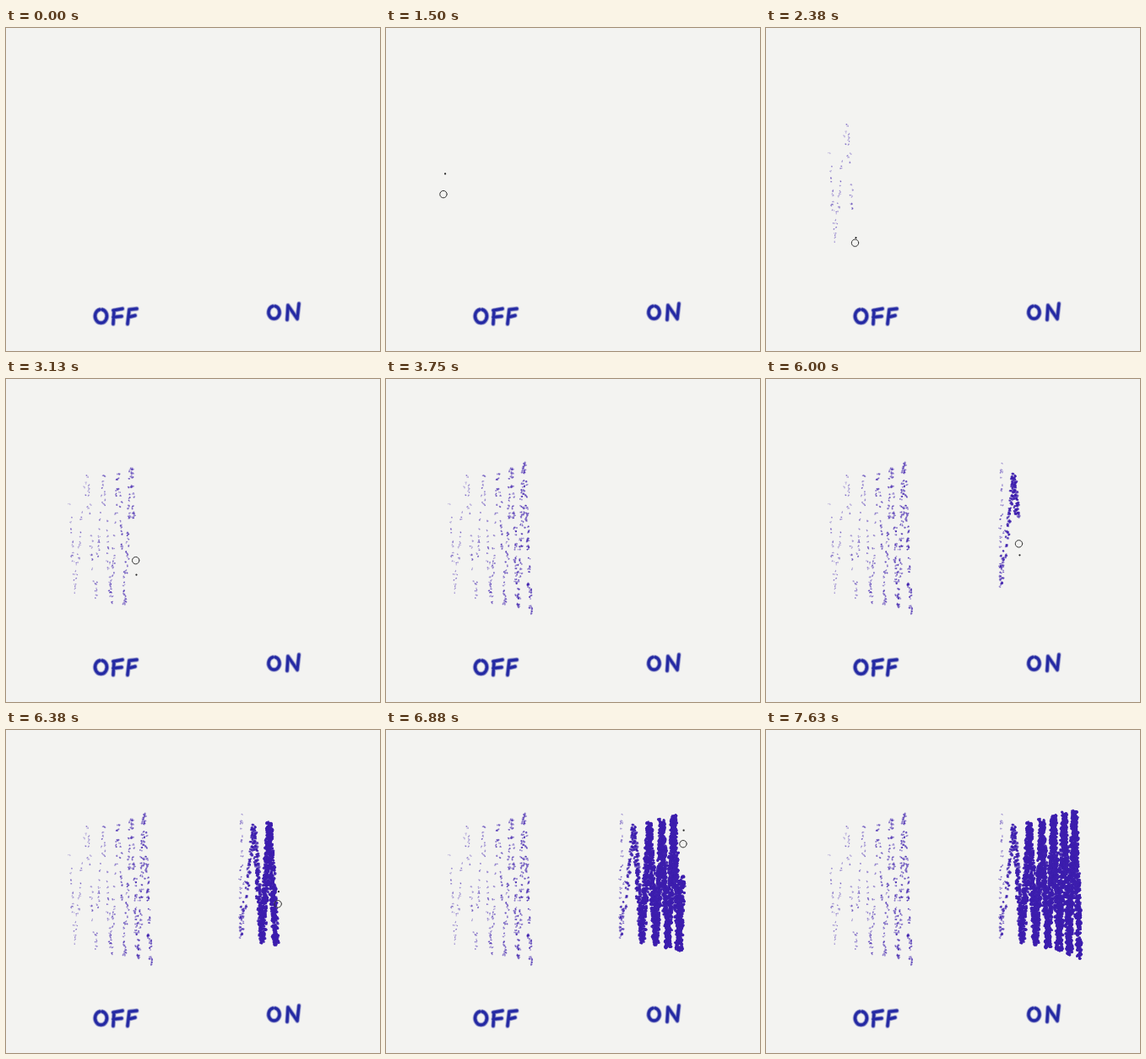
Write an HTML page with a canvas that moves like this. It is 443 px wide and 382 px high and loops after 9620 ms.

```html
<!DOCTYPE html>
<html lang="en">
<head>
<meta charset="utf-8">
<title>Pencil pressure off / on</title>
<style>
  html, body { margin: 0; width: 100%; height: 100%; overflow: hidden; background: #f3f3f1; }
  canvas { display: block; }
</style>
</head>
<body>
<canvas width="443" height="382" role="img" aria-label="OFF and ON pencil strokes"></canvas>
<script>
const ctx = document.querySelector('canvas').getContext('2d');
const LOOP = 9620, STEP = 125, LAST_STEP = 20;
const PAPER = '#f3f3f1', INK = '#3d1eae', LETTER = '#1c22a0';
const LAG = 0.25, LEAD = 0.1; // ink trails the brush, the pointer leads it

let seed = 7;
function rand() {
  seed = (seed * 1664525 + 1013904223) % 4294967296;
  return seed / 4294967296;
}
const lerp = (a, b, f) => a + (b - a) * f;

// Turns alternate between a bottom and a top line; bend < 1 packs the later ones closer.
function zigzag({ turns, x, top, bottom, bend }) {
  return Array.from({ length: turns }, (_, i) => {
    const f = i / (turns - 1);
    const edge = i % 2 ? top : bottom;
    return [lerp(...x, f ** bend), lerp(...edge, f)];
  });
}

// pace: key pairs of step and position along the path, counted in path points.
const scribbles = [
  {
    start: 1250, inkFrom: 2, pressure: 0.04, gain: 0.028,
    path: [
      [54, 358], [75, 116], [76, 148],
      ...zigzag({ turns: 11, x: [81, 171], top: [113, 98], bottom: [254, 277], bend: 0.8 }),
      [27, 250]
    ],
    pace: [[0, 0], [3, 1], [7, 3], [9, 4.97], [15, 10.66], [19, 14]]
  },
  {
    start: 5125, inkFrom: 1, pressure: 0.08, gain: 0.28,
    path: [
      [277, 32], [279, 97],
      ...zigzag({ turns: 13, x: [279, 371], top: [116, 94], bottom: [245, 267], bend: 0.74 }),
      [371, 345]
    ],
    pace: [[0, 0], [2, 1], [7, 3.6], [10, 6.32], [14, 10.78], [19, 15]]
  }
];

function pointAt(path, u) {
  const i = Math.min(Math.floor(u), path.length - 2);
  const f = Math.min(u - i, 1);
  return path[i].map((value, axis) => lerp(value, path[i + 1][axis], f));
}

function positionAt(pace, step) {
  const i = pace.findIndex(([s]) => s >= step);
  if (i === 0) return pace[0][1];
  const [s0, u0] = pace[i - 1], [s1, u1] = pace[i];
  return lerp(u0, u1, (step - s0) / (s1 - s0));
}

function scatter(radius) {
  const angle = rand() * Math.PI * 2, r = Math.sqrt(rand()) * radius;
  return [Math.cos(angle) * r, Math.sin(angle) * r];
}

// Grains come in small clumps; pressure widens, fills and darkens the stroke.
function makeGrains({ path, inkFrom, pressure, gain }) {
  const grains = [];
  for (let i = inkFrom; i < path.length - 2; i++) {
    const [x0, y0] = path[i], [x1, y1] = path[i + 1];
    const length = Math.hypot(x1 - x0, y1 - y0);
    for (let d = 0; d < length; d++) {
      const u = i + d / length;
      const [x, y] = pointAt(path, u);
      const press = Math.min(1, pressure + gain * (u - inkFrom));
      const clumps = Math.floor(0.13 + 1.4 * press ** 2 + rand());
      for (let c = 0; c < clumps; c++) {
        const [cx, cy] = scatter(1.8 + 1.5 * press);
        const alpha = Math.min(1, (0.35 + 0.65 * press) * lerp(0.75, 1.1, rand()));
        for (let n = 0; n < 3; n++) {
          const [dx, dy] = scatter(1.3);
          const radius = (0.6 + 0.9 * press) * lerp(0.8, 1.2, rand());
          grains.push({ u, x: x + cx + dx, y: y + cy + dy, radius, alpha });
        }
      }
    }
  }
  return grains;
}
scribbles.forEach(s => { s.grains = makeGrains(s); });

const lettering = new Path2D(`
  M111 333 a7 8 0 1 0 3 0
  M128 334 L127 350 M127 334 L138 332 M127 342 L137 341
  M146 333 L144 350 M146 333 L155 332 M145 342 L153 340
  M316 329 a6.5 7.5 0 1 0 3 0
  M333 345 L334 328 L345 344 L347 326`);

function drawLettering() {
  ctx.lineCap = ctx.lineJoin = 'round';
  ctx.strokeStyle = LETTER;
  for (const [width, alpha] of [[5.8, 0.22], [4.4, 0.5], [3, 0.9]]) {
    ctx.lineWidth = width;
    ctx.globalAlpha = alpha;
    ctx.stroke(lettering);
  }
  ctx.globalAlpha = 1;
}

function drawDot(x, y, radius) {
  ctx.beginPath();
  ctx.arc(x, y, radius, 0, Math.PI * 2);
  ctx.fill();
}

function drawBrush(path, u) {
  const [x, y] = pointAt(path, u);
  ctx.strokeStyle = '#333';
  ctx.lineWidth = 1;
  ctx.beginPath();
  ctx.arc(x, y, 4.2, 0, Math.PI * 2);
  ctx.stroke();
  ctx.fillStyle = '#222';
  drawDot(...pointAt(path, u + LEAD), 1.1);
}

function drawScribble({ path, pace, grains }, step) {
  if (step < 0) return;
  const done = step >= LAST_STEP;
  const u = done ? Infinity : positionAt(pace, step);
  ctx.fillStyle = INK;
  for (const g of grains) {
    if (g.u > u - LAG) break;
    ctx.globalAlpha = g.alpha;
    drawDot(g.x, g.y, g.radius);
  }
  ctx.globalAlpha = 1;
  if (!done) drawBrush(path, u);
}

let shown = '';
function frame() {
  const t = performance.now() % LOOP;
  const steps = scribbles.map(s =>
    Math.max(-1, Math.min(LAST_STEP, Math.floor((t - s.start) / STEP))));
  if (steps.join() !== shown) {
    shown = steps.join();
    ctx.fillStyle = PAPER;
    ctx.fillRect(0, 0, 443, 382);
    drawLettering();
    scribbles.forEach((s, i) => drawScribble(s, steps[i]));
  }
  requestAnimationFrame(frame);
}
frame();
</script>
</body>
</html>
```
